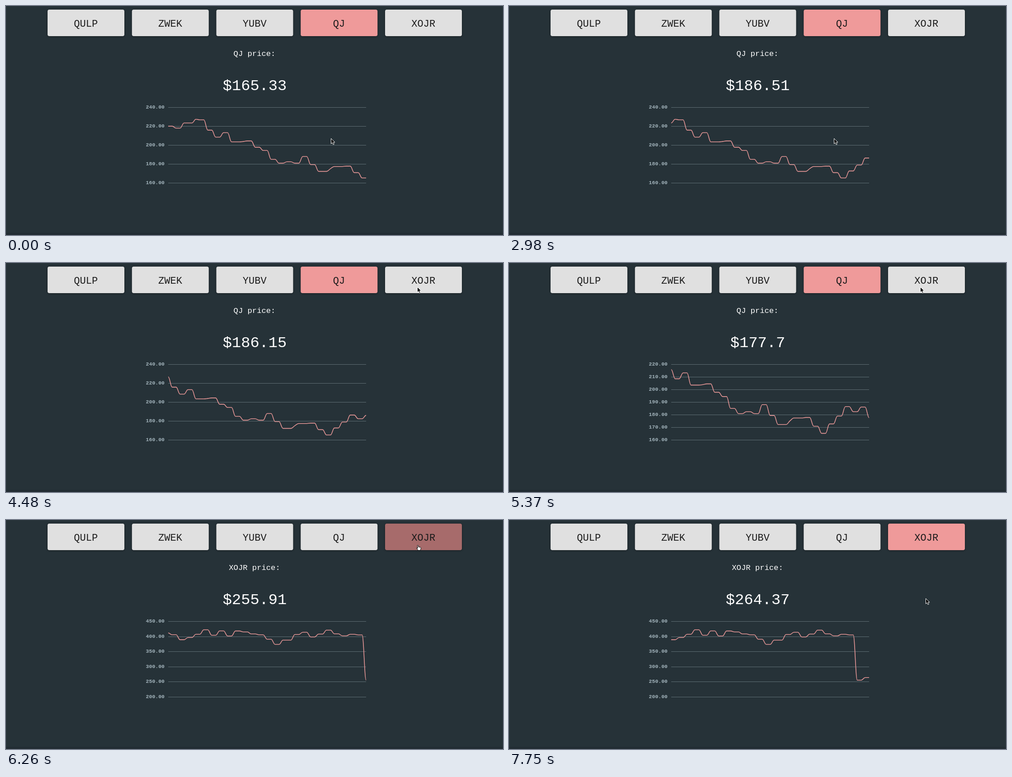
Write an HTML page that moves like this. It is 1100 px wide and 509 px high and loops after 8 s.

```html
<!DOCTYPE html>
<html lang="en">
<head>
<meta charset="utf-8">
<title>Stock ticker</title>
<style>
  html, body { margin: 0; width: 100%; height: 100%; overflow: hidden; background: #263238; }
  svg { display: block; width: 100%; height: 100%; }
  text { font-family: "Liberation Mono", monospace; text-anchor: middle; fill: #fff; }
  .button rect { filter: drop-shadow(0 1px 2px rgba(0, 0, 0, .4)); }
  .button text { font-size: 22px; fill: #1b1b1b; }
  #title { font-size: 17.2px; }
  #price { font-size: 33.7px; }
  #axis text { font-size: 11.5px; font-weight: bold; text-anchor: end; fill: #a3b4bc; }
  #axis path { stroke: #5f6f75; }
  #curve { fill: none; stroke: #e89797; stroke-width: 1.6; stroke-linejoin: round; }
</style>
</head>
<body>
<svg viewBox="0 0 1100 509">
  <rect y="504" width="1100" height="5" fill="#222c33"/>
  <g id="buttons"></g>
  <text id="title" x="550" y="111"></text>
  <text id="price" x="550.5" y="187"></text>
  <g id="axis"></g>
  <path id="curve"/>
  <g id="cursor">
    <path id="arrow" d="M.5 .5V12.2L3.2 9.7L5.1 14L7.2 13.1L5.4 8.9H9Z" fill="#000" stroke="#fff"/>
    <path id="hand" d="M2.5 1.5Q3.5 .2 4.5 1.5L5 4.8L9.3 5.6Q10.5 6 10.3 8L9.3 12.5H4.5L.8 8Q.5 6.5 2 7L3.3 8Z"
          fill="#fff" stroke="#000"/>
  </g>
</svg>
<script>
const LOOP = 8000, TICK = 149;
const CLICK = 39, SWITCH = 42;
const GREY = '#e0e0e0', PINK = '#ef9a9a';
const CHART = { left: 359, right: 797, top: 225.5, bottom: 393.5, steps: 50 };
const SYMBOLS = ['QULP', 'ZWEK', 'YUBV', 'QJ', 'XOJR'];

// A plain number is sampled twice; a list is taken as it stands.
const samples = list => list.flatMap(v => Array.isArray(v) ? v : [v, v]);

const first = samples([
  220.2, 218.1, 223.6, [223.6, 227.5], 226.9, 216, 208.6, 213.3, 203.6, [203.6, 204], 204.6,
  197.9, 194.5, 185.1, 181, 182.5, 181, 188.1, 179.5, 172.3, [172.3, 175.2], 177.5, [177.5],
  177.9, 171, 165.33, 172.81, 179.04, 186.51, 182.52, 186.15, [177.7]
]);
const second = samples([
  [412], 406, 389.5, 396.7, 407.6, 422.5, 404.2, 418.8, 402, 418.5, 415.3, 408.6, 405.7, 391.2,
  374.1, 388.2, [388.2], 406.8, 414.3, 398.7, 408.3, 421.3, 409.1, 402.4, 407.6, 405.4,
  255.91, 264.37
]);

const byId = id => document.getElementById(id);
const ease = p => p * p * (3 - 2 * p);
const progress = (tick, start, end) => ease(Math.min(1, Math.max(0, (tick - start) / (end - start))));
const shiftsAfter = ticks => Math.floor(ticks * 0.3 + 0.25);

byId('buttons').innerHTML = SYMBOLS.map((name, i) => {
  const x = 92 + i * 186.75;
  return `<g class="button"><rect x="${x}" y="8" width="170" height="59" rx="4" fill="${GREY}"/>
    <text x="${x + 84.7}" y="46">${name}</text></g>`;
}).join('');
const faces = document.querySelectorAll('.button rect');

// Smooth steps: slopes vanish at flats, extrema and both ends.
function curvePath(ys) {
  const dx = (CHART.right - CHART.left) / CHART.steps, reach = 0.4;
  const slope = i => {
    const before = ys[i] - ys[i - 1], after = ys[i + 1] - ys[i];
    return before * after > 0 ? 2 * before * after / (before + after) : 0;
  };
  let d = `M${CHART.left} ${ys[0]}`;
  for (let i = 1; i < ys.length; i++) {
    const x = CHART.left + i * dx;
    d += `C${x - dx * (1 - reach)} ${ys[i - 1] + slope(i - 1) * reach} ` +
         `${x - dx * reach} ${ys[i] - slope(i) * reach} ${x} ${ys[i]}`;
  }
  return d;
}

function drawChart(tick) {
  const switched = tick >= SWITCH;
  const shift = switched ? shiftsAfter(tick - SWITCH) : Math.min(11, shiftsAfter(tick));
  const [min, max, step] = switched ? [200, 450, 50] : shift < 10 ? [160, 240, 20] : [160, 220, 10];
  const values = (switched ? second : first).slice(shift, shift + CHART.steps + 1);
  const toY = v => CHART.top + (max - v) / (max - min) * (CHART.bottom - CHART.top);

  let axis = '';
  for (let v = max; v >= min; v -= step) {
    const y = Math.floor(toY(v)) + 0.5;
    axis += `<path d="M${CHART.left} ${y}H${CHART.right}"/><text x="351" y="${y + 2}">${v.toFixed(2)}</text>`;
  }
  byId('axis').innerHTML = axis;
  byId('curve').setAttribute('d', curvePath(values.map(toY)));
  byId('price').textContent = '$' + values.at(-1);
}

function drawButtons(tick) {
  const clicked = tick >= CLICK;
  byId('title').textContent = `${SYMBOLS[clicked ? 4 : 3]} price:`;
  faces[3].setAttribute('fill', tick < CLICK ? PINK : tick === CLICK ? '#e7bdbd' : GREY);
  faces[4].setAttribute('fill',
    tick < 37 ? GREY : tick < CLICK ? '#d5d5d5' : tick === CLICK ? '#be9090' :
    tick < 48 ? '#a76b6b' : tick === 48 ? '#d08686' : PINK);
}

function drawCursor(tick) {
  const over = progress(tick, 25, 30), away = progress(tick, 46, 52);
  const x = 719 + 191 * over + 12 * away;
  const y = 294 - 241 * over + 121 * away;
  const pointing = tick >= 37 && tick < 48;
  byId('cursor').setAttribute('transform', `translate(${x - (pointing ? 2 : 0)} ${y + (pointing ? 2 : 0)})`);
  byId('hand').style.display = pointing ? '' : 'none';
  byId('arrow').style.display = pointing ? 'none' : '';
}

let shown = -1;
function render(now) {
  const tick = Math.floor((now % LOOP + 5) / TICK);
  if (tick !== shown) {
    shown = tick;
    drawChart(tick);
    drawButtons(tick);
    drawCursor(tick);
  }
  requestAnimationFrame(render);
}
render(0);
</script>
</body>
</html>
```
